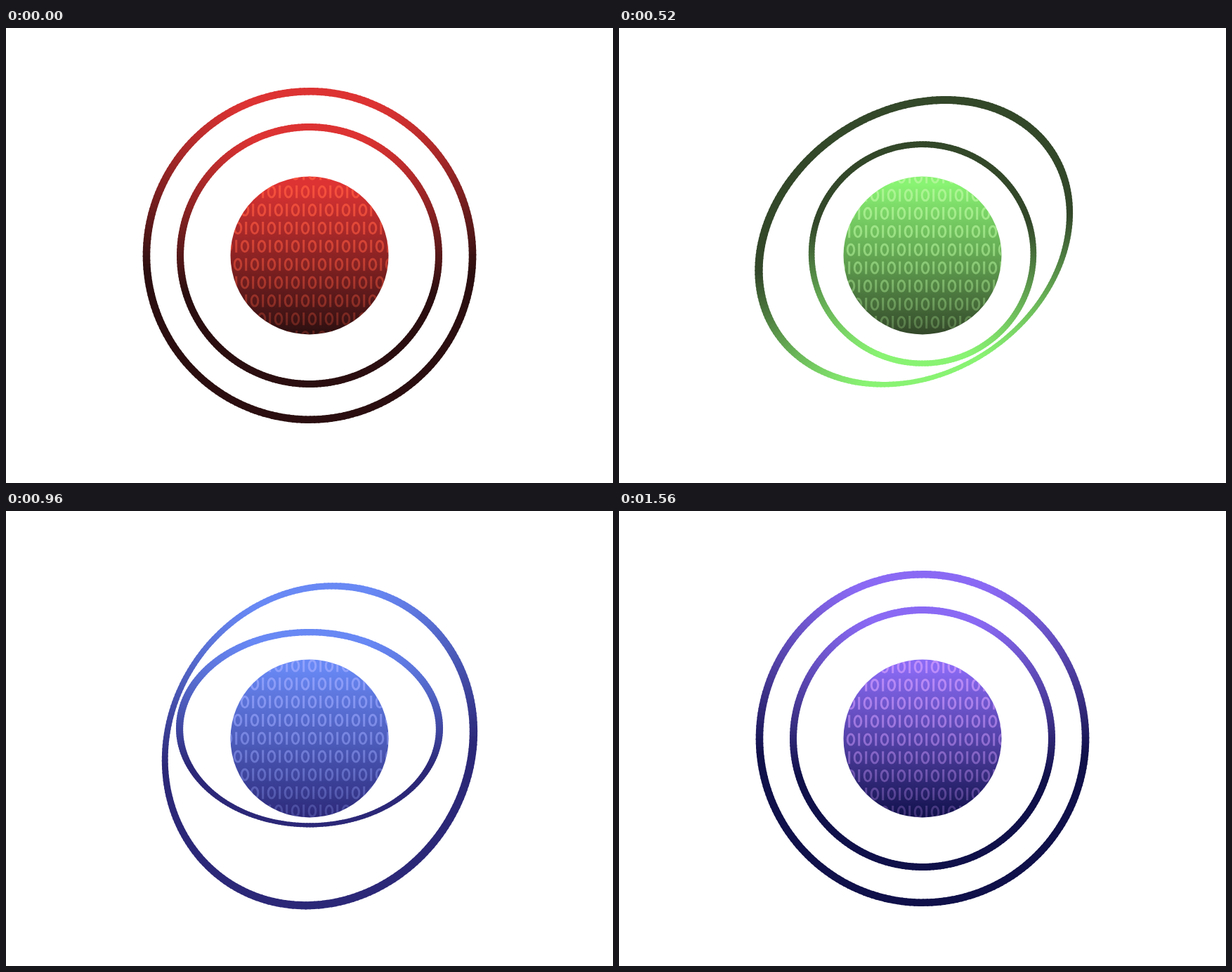
An HTML page with a canvas that plays this animation: 864 px wide and 648 px high, repeating every 1600 ms.

```html
<!DOCTYPE html>
<html lang="en">
<head>
<meta charset="utf-8">
<title>Orbiting rings</title>
<style>
  html, body { margin: 0; height: 100%; overflow: hidden; background: #fff; }
  canvas { display: block; }
</style>
</head>
<body>
<canvas id="stage" width="864" height="648"></canvas>
<script>
const ctx = document.getElementById('stage').getContext('2d');
const LOOP = 1600, STEP = 40, SPIN = 1080;
const CX = 432, CY = 324, RADIUS = 112.5, DEPTH = 1200;
const ROW = 25.85, COLUMN = 24;

// Rainbow keys: light, dark, digit colour
const PALETTE = [
  ['dd3333', '2b0f10', 'ff5a40'],
  ['ec8723', '9e4406', 'f8c040'],
  ['f5e63c', '8a6d14', 'fff79a'],
  ['7cf57a', '28422c', 'b0f8a0'],
  ['3cc4f4', '453bbc', '58e4fc'],
  ['5797f4', '3a348f', '84b0ff'],
  ['8a6af4', '10104a', 'cc98fc']
].map(key => key.map(hex => [0, 2, 4].map(i => parseInt(hex.slice(i, i + 2), 16))));

// Degrees at each time: inner ring about x, outer ring about x, outer ring about y
const TURNS = [
  [0, 0, 0, 0], [200, -67.6, 81.2, 30.8], [520, -173.5, 213, -19],
  [800, -267.5, 308.5, -71], [960, -318, 344.8, -19.7], [SPIN, -360, 360, 0]
];

const clamp = v => Math.min(1, Math.max(0, v));
const mix = (a, b, k) => a.map((v, i) => v + (b[i] - v) * k);
const rgba = (c, alpha = 1) => `rgba(${c.map(Math.round)},${alpha})`;

function colorsAt(t) {
  const pos = clamp(t / SPIN) * (PALETTE.length - 1);
  const i = Math.min(PALETTE.length - 2, Math.floor(pos));
  return PALETTE[i].map((c, j) => mix(c, PALETTE[i + 1][j], pos - i));
}

// Smooth curve through the turn keys, in radians
function turnAt(t, column) {
  const last = TURNS.length - 1;
  if (t >= SPIN) return 0;
  const i = TURNS.findIndex(key => key[0] > t) - 1;
  const slope = n => {
    const a = TURNS[Math.max(0, n - 1)], b = TURNS[Math.min(last, n + 1)];
    return (b[column] - a[column]) / (b[0] - a[0]);
  };
  const p = TURNS[i], q = TURNS[i + 1], span = q[0] - p[0], k = (t - p[0]) / span;
  const degrees = p[column] * (1 + 2 * k) * (1 - k) ** 2 + q[column] * k * k * (3 - 2 * k)
    + span * k * (1 - k) * (slope(i) * (1 - k) - slope(i + 1) * k);
  return degrees * Math.PI / 180;
}

function drawRing({ rx, ry, width, darkAt, a, b = 0, scale = 1 }, light, dark) {
  const parts = 240, sa = Math.sin(a), ca = Math.cos(a), sb = Math.sin(b), cb = Math.cos(b);
  const project = (angle, inset) => {
    const x = (rx - inset) * scale * Math.cos(angle);
    const y = (ry - inset) * scale * Math.sin(angle);
    const k = DEPTH / (DEPTH - y * sa + x * sb * ca);
    return [CX + x * cb * k, CY - (y * ca + x * sb * sa) * k];
  };
  for (let i = 0; i < parts; i++) {
    const from = i * 2 * Math.PI / parts, to = (i + 1.3) * 2 * Math.PI / parts;
    const down = (1 - Math.sin((from + to) / 2)) / 2;
    ctx.fillStyle = rgba(mix(light, dark, clamp((down - .04) / (darkAt - .04))));
    ctx.beginPath();
    ctx.moveTo(...project(from, 0));
    ctx.lineTo(...project(to, 0));
    ctx.lineTo(...project(to, width));
    ctx.lineTo(...project(from, width));
    ctx.fill();
  }
}

function sphereGradient(...stops) {
  const g = ctx.createLinearGradient(0, CY - RADIUS, 0, CY + RADIUS);
  stops.forEach(([at, color]) => g.addColorStop(at, color));
  return g;
}

function spherePath() {
  ctx.beginPath();
  ctx.arc(CX, CY, RADIUS, 0, 2 * Math.PI);
}

function drawDigits(t, color) {
  ctx.save();
  spherePath();
  ctx.clip();
  ctx.strokeStyle = sphereGradient([0, rgba(color, .8)], [.5, rgba(color, .52)], [1, rgba(color, .22)]);
  ctx.lineWidth = 3;
  ctx.beginPath();
  for (let row = -4; row < 9; row++) {
    const y = 285 - .0404 * t + row * ROW;
    const shift = row % 2 ? 10 : 0;
    for (let x = 306 + shift; x < 560; x += COLUMN) {
      ctx.moveTo(x + 4.8, y);
      ctx.ellipse(x, y, 4.8, 7.7, 0, 0, 2 * Math.PI);
      ctx.moveTo(x + 11.7, y - 9);
      ctx.lineTo(x + 11.7, y + 9);
    }
  }
  ctx.stroke();
  ctx.restore();
}

function draw(t) {
  const [light, dark, digit] = colorsAt(t);
  const innerTurn = turnAt(t, 1);
  ctx.clearRect(0, 0, 864, 648);

  ctx.fillStyle = sphereGradient([.05, rgba(light)], [.55, rgba(mix(light, dark, .5))], [1, rgba(dark)]);
  spherePath();
  ctx.fill();

  drawRing({
    rx: 189, ry: 188, width: 10, darkAt: .65, a: innerTurn,
    scale: 1 - .143 * Math.max(0, -Math.cos(innerTurn))
  }, light, dark);
  drawRing({
    rx: 237.3, ry: 239, width: 10.5, darkAt: .55, a: turnAt(t, 2), b: turnAt(t, 3)
  }, light, dark);

  drawDigits(t, digit);
}

function tick() {
  const t = performance.now() % LOOP;
  draw(Math.floor(t / STEP) * STEP);
  requestAnimationFrame(tick);
}
tick();
</script>
</body>
</html>
```
